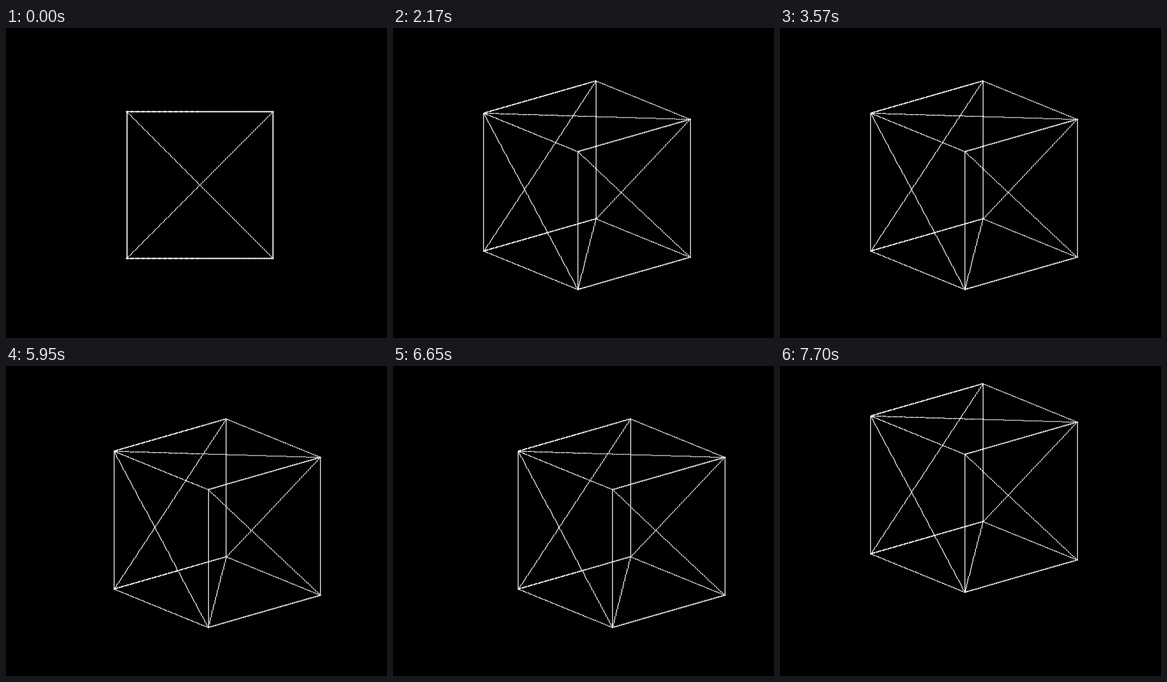
Animation, 650 px wide and 528 px high, one loop 8000 ms. Source, as an HTML page with a canvas:

```html
<!DOCTYPE html>
<html>
<head>
<meta charset="utf-8">
<style>
  html, body { margin: 0; width: 100%; height: 100%; overflow: hidden; background: #000; }
  canvas { display: block; }
</style>
</head>
<body>
<canvas id="stage" width="650" height="528"></canvas>
<script>
const ctx = document.getElementById('stage').getContext('2d');
const LOOP = 8000, RADIUS = 124.95, TURN = Math.PI / 9;

// Each key press turns or moves the cube by one fixed step
const presses = (t, ...times) => times.filter(time => t >= time).length;
const poseAt = t => ({
  yaw: TURN * presses(t, 1400, 1890),
  pitch: TURN * (presses(t, 2170, 2870) - presses(t, 3570)),
  right: 29.5 * (presses(t, 5950, 6160, 6370) - presses(t, 6650, 6930, 7210)),
  down: -30 * presses(t, 7490, 7700)
});

// The bits of a corner's index are its x, y and z side
const bitCount = n => (n & 1) + (n >> 1 & 1) + (n >> 2 & 1);

// Cube edges differ in one bit; each face also has one diagonal
function isLine(a, b) {
  const diff = a ^ b;
  if (bitCount(diff) === 1) return true;
  const odd = bitCount(a) % 2 === 1;
  return bitCount(diff) === 2 && odd === (diff === 3);
}

function project(corner, { yaw, pitch, right, down }) {
  const [x, y, z] = [1, 2, 4].map(bit => corner & bit ? 1 : -1);
  const px = x * Math.cos(yaw) + z * Math.sin(yaw);
  const pz = z * Math.cos(yaw) - x * Math.sin(yaw);
  const py = y * Math.cos(pitch) + pz * Math.sin(pitch);
  return [330.98 + RADIUS * px + right, 267.4 + RADIUS * py + down];
}

// Coarse columns give the lines their broken, dotted look
function snap(x) {
  const grid = x < 331 ? 1.12 : 1.5;
  return Math.floor(Math.floor(x / grid) * grid + 0.5);
}

// Dots slightly larger than a pixel leave a faint fringe
function line([x0, y0], [x1, y1], bias) {
  const dx = x1 - x0, dy = y1 - y0;
  const n = Math.ceil(Math.max(Math.abs(dx), Math.abs(dy)));
  const column = Math.abs(dx) < 1 ? Math.floor : snap;
  for (let i = 0; i <= n; i++) {
    const x = column(x0 + dx * i / n), y = Math.floor(y0 + dy * i / n + bias);
    ctx.fillRect(x - 0.15, y - 0.15, 1.3, 1.3);
  }
}

function draw(now) {
  const pose = poseAt(now % LOOP);
  ctx.fillStyle = '#000';
  ctx.fillRect(0, 0, 650, 528);
  ctx.fillStyle = '#fff';
  for (let b = 1; b < 8; b++) {
    for (let a = 0; a < b; a++) {
      if (!isLine(a, b)) continue;
      const from = project(a, pose), to = project(b, pose);
      line(from, to, 0.5);
      if ((a ^ b) === 1) line(from, to, 0); // edges along x are thicker
    }
  }
  requestAnimationFrame(draw);
}
draw(performance.now());
</script>
</body>
</html>
```
